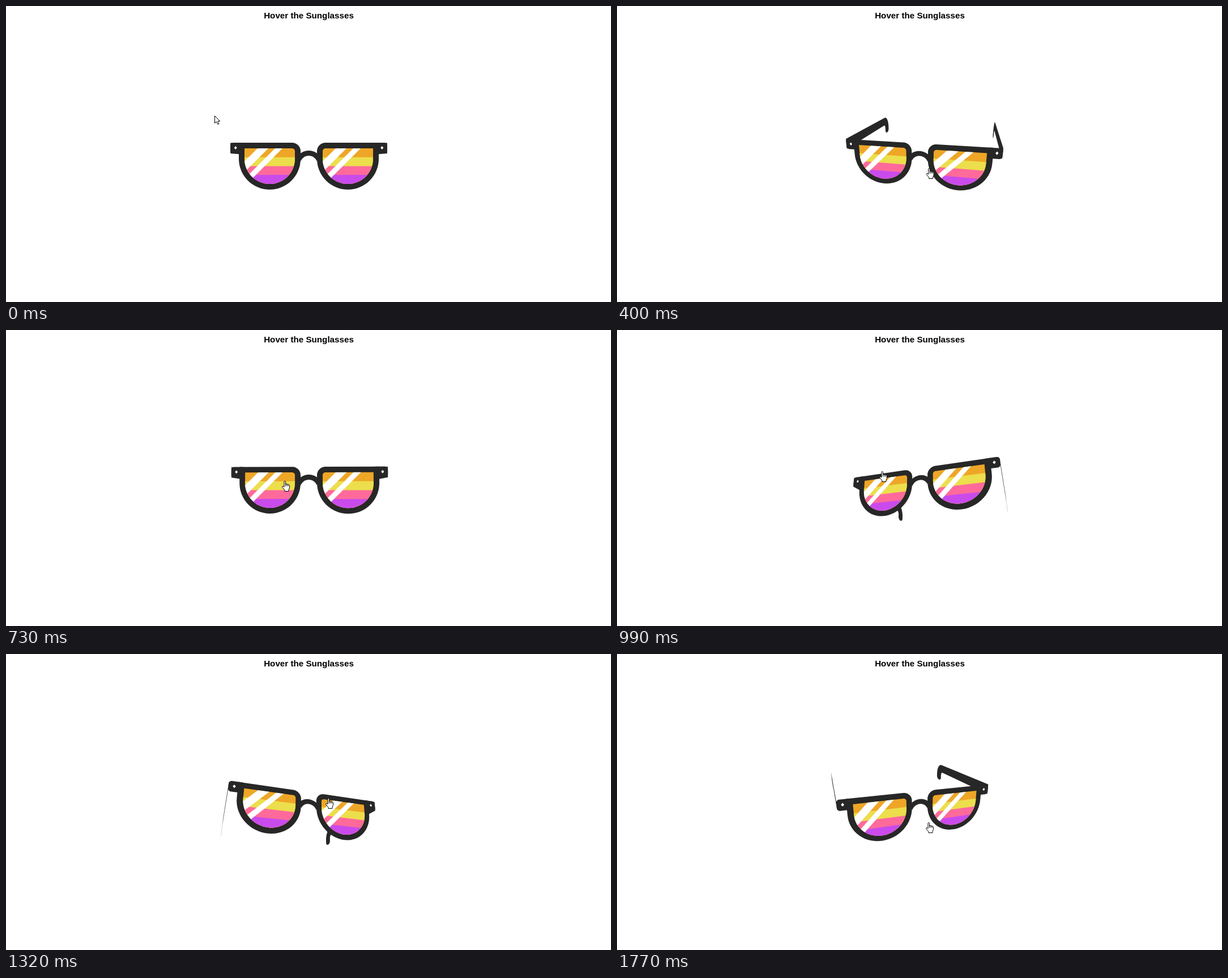
Recreate the animation shown at these times as an HTML page with a canvas. Size 1068 by 524 pixels, loop 1.96 s.

```html
<!DOCTYPE html>
<html lang="en">
<head>
<meta charset="utf-8">
<title>Hover the Sunglasses</title>
<style>
  html, body { margin: 0; width: 100%; height: 100%; overflow: hidden; background: #fff; }
  canvas { position: absolute; left: 0; top: 0; }
  h1 {
    position: absolute; left: 0; top: 7px; width: 1069px; margin: 0;
    font: bold 15.2px/20px "Liberation Sans", Arial, sans-serif;
    text-align: center; color: #000;
  }
</style>
</head>
<body>
<canvas id="stage" width="1068" height="524"></canvas>
<h1>Hover the Sunglasses</h1>
<script>
const ctx = document.getElementById('stage').getContext('2d');
const LOOP = 1960, CX = 534.5, CY = 272.4, DEPTH = 450;
const DARK = '#262726';
const STRIPES = ['#eea627', '#ecde4c', '#ff6a9b', '#c94bec'];
const BANDS = [[696, 715], [727, 740]];

// Moments at which the picture advances
const STEPS = [0, 120, 190, 260, 330, 400, 470, 540, 610, 660, 730, 800, 870, 920, 990,
  1060, 1130, 1190, 1260, 1320, 1370, 1440, 1510, 1570, 1640, 1700, 1770];

// time, rotateX, rotateY in degrees
const POSES = [
  [120, 0, 0], [190, -5, -6], [260, -14.5, -15], [330, -19.5, -19.5],
  [400, -20, -12], [470, -20, 10], [540, -19.7, 19.5], [610, -20, 20],
  [730, 1.5, -2], [870, 19, -19], [920, 20, -20], [990, 20, -20],
  [1130, 20, 0], [1260, 20, 18], [1320, 20, 20], [1440, 20, 20],
  [1570, 0, 20], [1640, -15, 20], [1700, -20, 20]
];

// time, left, top of the pointer
const POINTER = [
  [0, 368.5, 194.5], [120, 412, 221], [260, 517, 286], [330, 526, 289],
  [540, 585, 283], [610, 578, 282], [730, 487, 267], [870, 466, 254],
  [990, 463, 250], [1060, 500, 251], [1130, 536, 252], [1320, 564, 255],
  [1440, 559, 268], [1570, 550, 290], [1700, 545, 297], [1770, 545, 298]
];

const ARROW = new Path2D('M0 0V13L3 10.2L5.2 15L7.4 14L5.3 9.4H9.3Z');
const HAND = new Path2D('M4 11V1.8Q4 .5 5.3 .5T6.6 1.8V6.3Q6.8 5.2 7.9 5.3T9 6.6' +
  'Q9.4 5.8 10.4 6T11.3 7.3Q11.8 6.6 12.7 7T13.5 8.5V12.5L12 16V18.5H5V16.5' +
  'L1 11.6Q0 10 1.2 9.5Q2.3 9.2 4 11Z');
const FINGERS = new Path2D('M6.6 6V9.5M9 6.6V9.5M11.3 7.3V9.5');

function track(keys, t) {
  let i = keys.findIndex(k => k[0] > t);
  if (i < 0) return keys[keys.length - 1].slice(1);
  if (i === 0) return keys[0].slice(1);
  const a = keys[i - 1], b = keys[i], f = (t - a[0]) / (b[0] - a[0]);
  return [1, 2].map(n => a[n] + (b[n] - a[n]) * f);
}

function arc(cx, cy, rx, ry, from, to) {
  return Array.from({ length: 33 }, (_, i) => {
    const a = (from + (to - from) * i / 32) * Math.PI / 180;
    return [cx + rx * Math.cos(a), cy + ry * Math.sin(a)];
  });
}

const mirror = pts => pts.map(([x, y]) => [2 * CX - x, y]);
const shift = (pts, dx) => pts.map(([x, y]) => [x + dx, y]);
const rect = (x0, y0, x1, y1) => [[x0, y0], [x1, y0], [x1, y1], [x0, y1]];

const lens = inset => [
  [411 + inset, 242 + inset],
  ...arc(505, 257, 15 - inset, 15 - inset, -90, 0),
  ...arc(465.5, 270.5, 54.5 - inset, 54.5 - inset, 0, 180)
];
const rim = lens(0), glass = lens(10);
const tab = [
  [418, 242], [418, 261],
  ...arc(401, 256, 5, 5, 90, 180), ...arc(401, 247, 5, 5, 180, 270)
];
const gem = [[405.2, 248], [407.7, 251], [405.2, 254], [402.7, 251]];
const bridge = [
  ...arc(CX, 280, 24, 24, -138, -42), ...arc(CX, 280, 15, 15, -20, -160)
];
// Side view of a temple: distance behind the front, height
const temple = [
  [0, 242], ...arc(212, 270, 28, 28, -90, 0), ...arc(227, 276, 13, 8, 0, 180),
  ...arc(205, 270, 9, 9, 0, -90), [0, 261]
];

function projector(rx, ry) {
  const a = rx * Math.PI / 180, b = ry * Math.PI / 180;
  const sa = Math.sin(a), ca = Math.cos(a), sb = Math.sin(b), cb = Math.cos(b);
  return ([x, y, z = 0]) => {
    x -= CX; y -= CY;
    const x1 = x * cb + z * sb, z1 = z * cb - x * sb;
    const s = DEPTH / (DEPTH - y * sa - z1 * ca);
    return [CX + x1 * s, CY + (y * ca - z1 * sa) * s];
  };
}

function drawGlasses(rx, ry) {
  const project = projector(rx, ry);
  const trace = pts => {
    ctx.beginPath();
    pts.forEach(p => ctx.lineTo(...project(p)));
    ctx.closePath();
  };
  const fill = (pts, color) => {
    trace(pts);
    ctx.fillStyle = color;
    ctx.fill();
  };

  for (const side of [-1, 1])
    fill(temple.map(([u, y]) => [CX + side * 138.3, y, -u]), DARK);

  fill(bridge, DARK);
  for (const flip of [p => p, mirror]) {
    fill(flip(tab), DARK);
    fill(flip(rim), DARK);
    fill(flip(gem), '#fff');

    const dx = flip === mirror ? 138 : 0;
    ctx.save();
    trace(flip(glass));
    ctx.clip();
    STRIPES.forEach((color, i) => {
      const y = 252 + i * 15.7;
      fill(shift(rect(415, i ? y : 246, 516, 320), dx), color);
    });
    for (const [s, e] of BANDS)
      fill(shift([[s - 248, 248], [e - 248, 248], [e - 318, 318], [s - 318, 318]], dx), '#fff');
    ctx.restore();
  }
}

function drawPointer(x, y, hand) {
  ctx.save();
  ctx.translate(x, y);
  ctx.fillStyle = '#fff';
  ctx.strokeStyle = '#000';
  ctx.lineWidth = 1;
  ctx.lineJoin = 'round';
  const shape = hand ? HAND : ARROW;
  ctx.fill(shape);
  ctx.stroke(shape);
  if (hand) ctx.stroke(FINGERS);
  ctx.restore();
}

function draw(now) {
  const time = now % LOOP;
  const t = STEPS.filter(s => s <= time).pop() || 0;
  ctx.clearRect(0, 0, 1068, 524);
  drawGlasses(...track(POSES, t));
  drawPointer(...track(POINTER, t), t >= 190);
}

const start = performance.now();
function tick() {
  draw(performance.now() - start);
  requestAnimationFrame(tick);
}
tick();
</script>
</body>
</html>
```
